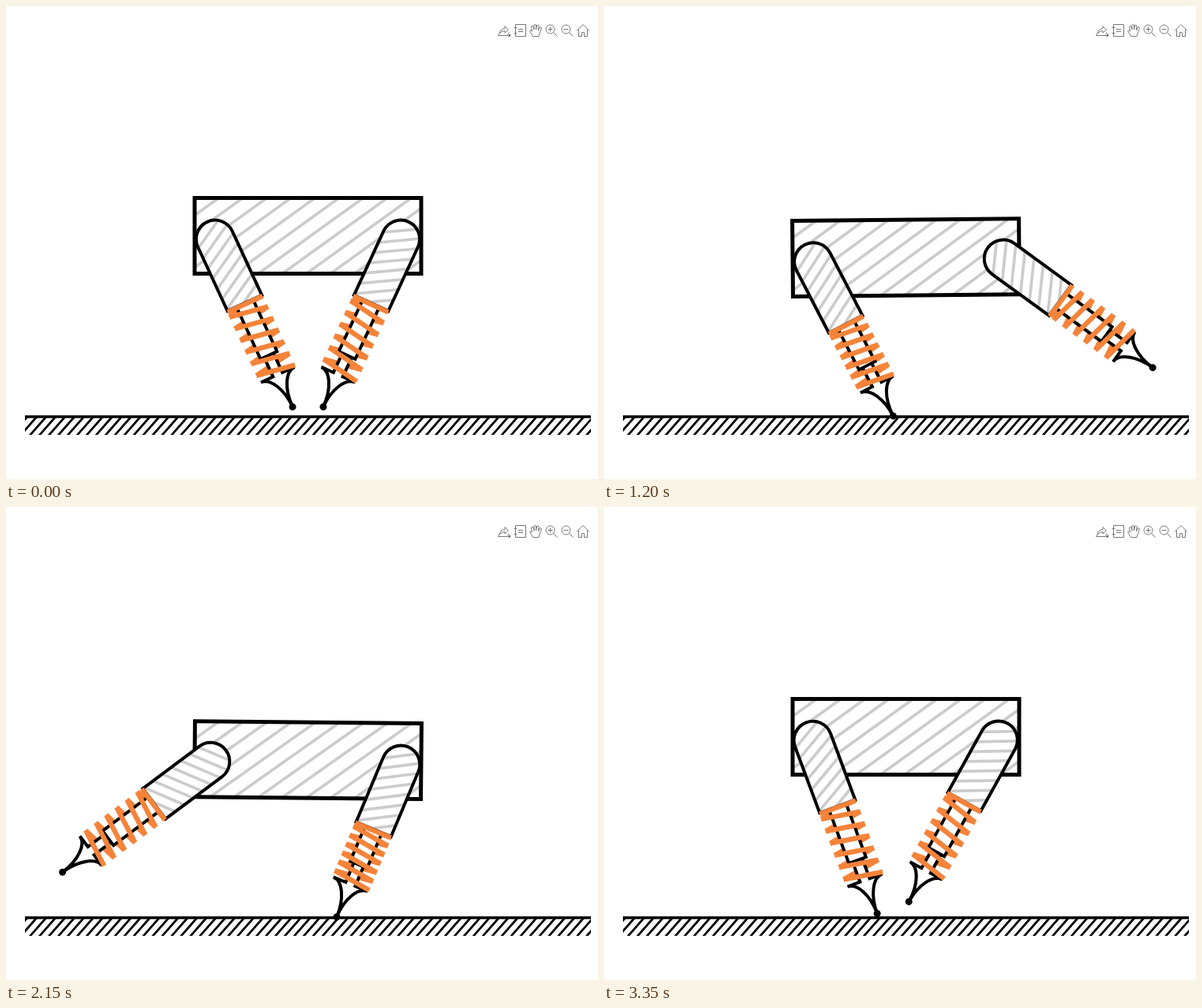
Write an HTML page with a canvas that moves like this. It is 750 by 600 pixels and loops after 3400 ms.

```html
<!DOCTYPE html>
<html lang="en">
<head>
<meta charset="utf-8">
<title>Bounding legs</title>
<style>
html, body { margin: 0; height: 100%; overflow: hidden; background: #fff; }
canvas { display: block; }
</style>
</head>
<body>
<canvas id="stage" width="750" height="600"></canvas>
<script>
const ctx = document.getElementById('stage').getContext('2d');
const LOOP = 3400, STEP = 50;
const UNIT = 239;                   // rest length of a leg
const MID = 382.5, HIP = UNIT / 2;  // body centre, hip offset
const GROUND = 520;
const TOUCH = 1136, LIFT = 1810;    // stance of the left leg
const ORANGE = 'rgb(245,131,58)', GRAY = '#ccc';

function stroke(color, width, path) {
  ctx.strokeStyle = color;
  ctx.lineWidth = width;
  path ? ctx.stroke(path) : ctx.stroke();
}

function line(x1, y1, x2, y2) {
  ctx.moveTo(x1, y1);
  ctx.lineTo(x2, y2);
}

function outline(width) {
  ctx.fillStyle = '#fff';
  ctx.fill();
  stroke('#000', width);
}

// ---- motion ----

// Ballistic flight, then a smooth stop at the lowest point; even in time.
function bodyY(t) {
  const u = Math.min(t, LOOP - t), top = 291.5, k = 1.92e-5, end = 1140;
  if (u <= end) return top + k * u * u;
  const span = LOOP / 2 - end, h = (u - end) / span;
  const y0 = top + k * end * end, v0 = 2 * k * end;
  return y0 + (332.3 - y0) * h * h * (3 - 2 * h) + v0 * span * h * (1 - h) ** 2;
}

function pitch(t) {
  const u = Math.min(t, LOOP - t) / (LOOP / 2);
  const tilt = 2.75 / 287 * Math.sin(Math.PI * u ** 1.7);
  return t < LOOP / 2 ? -tilt : tilt;
}

// Angle (positive: foot to the right) and length of the left leg.
function legPose(t) {
  if (t > TOUCH && t < LIFT) {
    const dx = 346 - 0.407 * (t - 1250) - (MID - HIP);
    const dy = GROUND - bodyY(t) + HIP * Math.sin(pitch(t));
    return [Math.atan2(dx, dy), Math.hypot(dx, dy)];
  }
  const s = t <= TOUCH ? t + LOOP : t;
  return [54.2 * Math.PI / 180 * Math.sin(0.00179 * (s - 3135)), UNIT];
}

// ---- drawing ----

function drawGround() {
  ctx.save();
  ctx.beginPath();
  ctx.rect(24, 519, 717, 25);
  ctx.clip();
  ctx.beginPath();
  for (let x = 6; x < 745; x += UNIT / 20) line(x, 545, x + 21, 521);
  stroke('#000', 2.7);
  ctx.restore();
  ctx.beginPath();
  line(24, 521, 741, 521);
  stroke('#000', 3.4);
}

function drawBody(y, tilt) {
  ctx.save();
  ctx.translate(MID, y);
  ctx.rotate(tilt);
  ctx.save();
  ctx.beginPath();
  ctx.rect(-143.5, -48, 287, 96);
  ctx.fillStyle = '#fff';
  ctx.fill();
  ctx.clip();
  ctx.beginPath();
  for (let x = -113; x < 300; x += 30.5) line(x + 7, -53, x - 133, 48);
  stroke(GRAY, 3.7);
  ctx.restore();
  ctx.strokeStyle = '#000';
  ctx.lineWidth = 5;
  ctx.strokeRect(-143.5, -48, 287, 96);
  ctx.restore();
}

function drawShank(len) {
  const base = len - 45, neck = len - 72;
  ctx.beginPath();
  ctx.moveTo(-6.5, neck);
  ctx.lineTo(-6.5, base);
  ctx.lineTo(-23.5, base);
  ctx.ellipse(-23.5, len, 23.5, 45, 0, -Math.PI / 2, 0);
  ctx.ellipse(23.5, len, 23.5, 45, 0, Math.PI, Math.PI * 1.5);
  ctx.lineTo(6.5, base);
  ctx.lineTo(6.5, neck);
  outline(4);
  ctx.beginPath();
  ctx.rect(-11.5, 85, 23, neck - 85);
  outline(4);
  ctx.beginPath();
  ctx.arc(0, len, 4.5, 0, 2 * Math.PI);
  ctx.fillStyle = '#000';
  ctx.fill();
}

function drawThigh() {
  const shape = new Path2D();
  shape.arc(0, 4.6, 24, Math.PI, 0);
  shape.lineTo(24, 94);
  shape.lineTo(-24, 94);
  shape.closePath();
  ctx.save();
  ctx.fillStyle = '#fff';
  ctx.fill(shape);
  ctx.clip(shape);
  ctx.beginPath();
  for (let y = -22; y < 115; y += 14.3) line(-26, y + 15, 26, y - 15);
  stroke(GRAY, 3.7);
  ctx.restore();
  stroke('#000', 4, shape);
}

function drawLeg(x, y, angle, len) {
  const top = 94, half = (len - 47 - top) / 12;
  const coils = side => {
    ctx.beginPath();
    for (let i = side > 0 ? 0 : 1; i < 12; i += 2)
      line(25 * side, top + i * half, -25 * side, top + (i + 1) * half);
  };
  ctx.save();
  ctx.translate(x, y);
  ctx.rotate(-angle);
  coils(1);
  stroke(ORANGE, 6.3);
  drawShank(len);
  drawThigh();
  coils(-1);
  line(-24.5, 95.3, 24.5, 95.3);
  stroke(ORANGE, 6.3);
  ctx.restore();
}

const icons = new Path2D(
  'M626 33l-2.500 4.500h12l1.500-4M625.500 34.500q1-6 6.500-6v-3l4.500 4.500-4.500 4v-2.500q-4 0-6.500 3z' +      // export
  'M645.500 27.500v-4h13v15h-13v-4M643.500 27.500h4M643.500 34.500h4M649 29.500h6M649 32.500h6M645.500 27.500v7' + // notes
  'M667.500 38.500l-4-7q1-2 3 .5l-1-6q1.500-2 2.500 0l1 4v-6q1.500-1.500 2.500 0v6l1-5.500q2-1 2.500 .5l-.5 6 1.500-4q2-1 2.500 1l-2.500 7-1 3.500z' + // hand
  'M695 29.500a5.500 5.500 0 1 1-11 0a5.500 5.500 0 1 1 11 0M693.500 33.500l5 5M686.500 29.500h6M689.500 26.500v6' +  // zoom in
  'M715 29.500a5.500 5.500 0 1 1-11 0a5.500 5.500 0 1 1 11 0M713.500 33.500l5 5M706.500 29.500h6' +               // zoom out
  'M723 31.500l8-8 8 8M725.500 29.500v9h4v-5h3v5h4v-9');                                                     // home
const corner = new Path2D('M639 35v3.500h-3.500z');

function draw(t) {
  ctx.fillStyle = '#fff';
  ctx.fillRect(0, 0, 750, 600);
  drawGround();
  const y = bodyY(t), tilt = pitch(t), drop = HIP * Math.sin(tilt);
  drawBody(y, tilt);
  // The right leg mirrors the left one with time reversed.
  const [la, ll] = legPose(t);
  const [ra, rl] = legPose((LOOP - t) % LOOP);
  drawLeg(MID - HIP, y - drop, la, ll);
  drawLeg(MID + HIP, y + drop, -ra, rl);
  stroke('#777', 1, icons);
  ctx.fillStyle = '#555';
  ctx.fill(corner);
}

const start = performance.now();
function tick() {
  const t = (performance.now() - start) % LOOP;
  draw(Math.floor(t / STEP) * STEP);
  requestAnimationFrame(tick);
}
tick();
</script>
</body>
</html>
```
